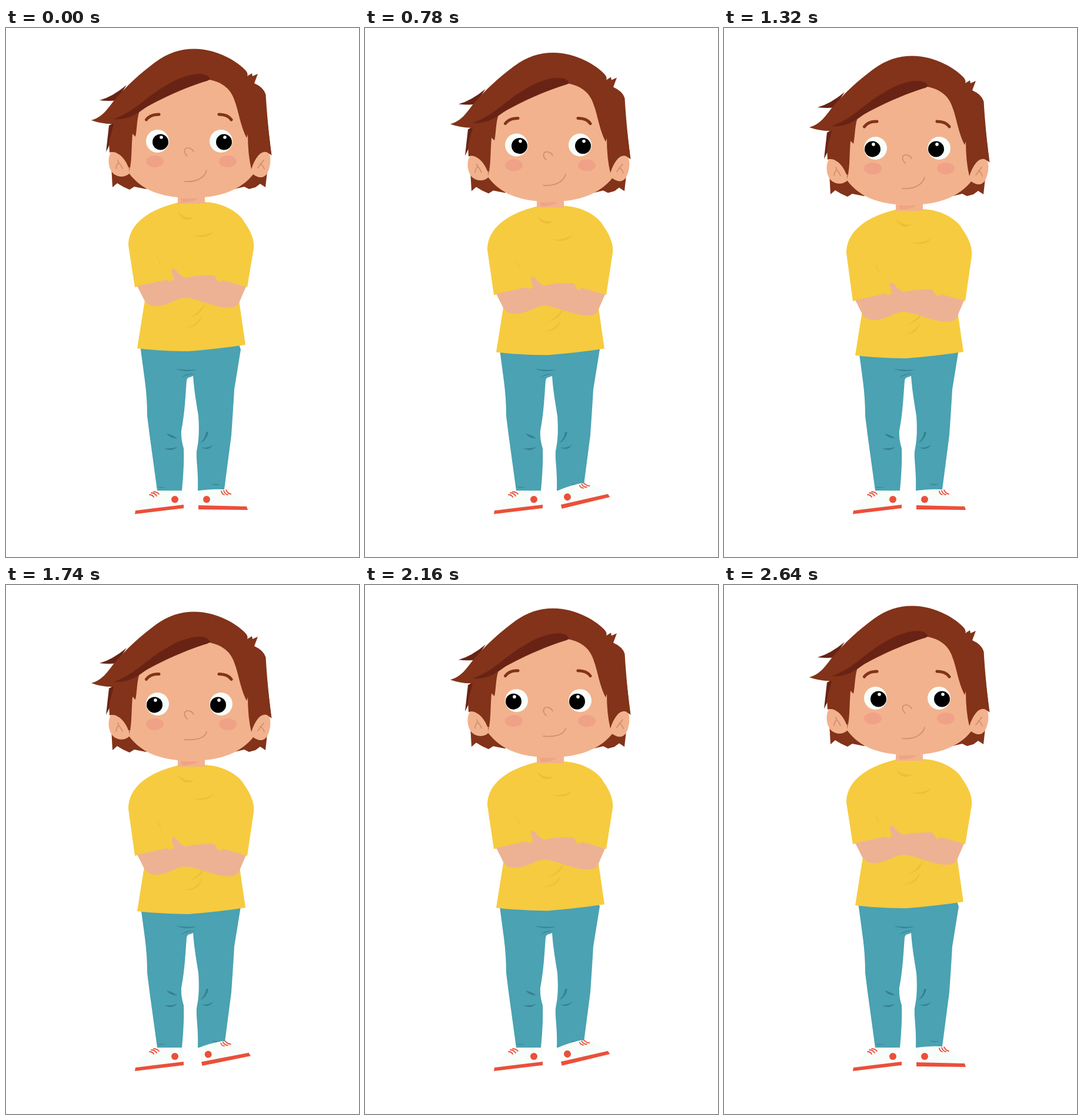
An HTML page that plays this animation: 600x900 px, repeating every 2.7 s.

```html
<!DOCTYPE html>
<html lang="en">
<head>
<meta charset="utf-8">
<title>Boy tapping his foot</title>
<style>
  html, body { margin: 0; height: 100%; overflow: hidden; background: #fff; }
  svg { display: block; width: 100%; height: 100%; }
  .hair { fill: #823319; }
  .dark { fill: #682315; }
  .skin { fill: #f2b28d; }
  .shirt { fill: #f6cb3f; }
  .fold { fill: #edbe3c; }
  .white { fill: #f9fdfa; }
  .red { fill: #eb4f3a; }
  .line { fill: none; stroke: #d08e6e; stroke-width: 1.7; stroke-linecap: round; }
  .lace { fill: none; stroke: #eb4f3a; stroke-width: 1.8; stroke-linecap: round; }
  .brow { fill: none; stroke: #823319; stroke-width: 5; stroke-linecap: round; }
</style>
</head>
<body>
<svg viewBox="0 0 600 900">
  <g id="legs">
    <path fill="#4aa2b2" d="M228 540L236 600Q240 630 240 660L244 692L257 787H299C301 765 303 740 302 715C297 698 298 690 298 685C304 655 305 625 307 600Q308 594 313 594L318 592C320 620 324 640 327 660C329 690 327 705 324 720C323 738 327 750 326 787L371 785L383 693Q386 650 388 615L399 547L395 535Z"/>
    <path fill="#36808e" d="M289 580Q305 583 325 581Q307 587 289 580M298 595Q305 587 323 588Q308 589 298 595M273 690Q283 692 291 698Q280 699 273 690M269 715Q280 716 291 713Q280 722 269 715M330 706Q339 698 340 688Q346 684 342 694Q338 703 330 706M331 713Q342 716 352 709Q344 721 331 713M256 780Q262 782 273 781Q262 784 256 780M349 775Q357 777 365 776Q357 780 349 775"/>
  </g>
  <g id="leftShoe">
    <path class="white" d="M257 787Q232 798 220 822L302 812L301 787Z"/>
    <path class="red" d="M220 821L302 811V817L219 827Z"/>
    <circle class="red" cx="287" cy="802" r="6"/>
    <path class="lace" d="M244 794Q249 794 251 798M247 791Q253 791 256 796M251 789Q257 789 260 793"/>
  </g>
  <g id="rightShoe">
    <path class="white" d="M326 788Q345 784 369 785Q399 794 409 815L327 813Z"/>
    <path class="red" d="M327 812L409 814L411 820L327 819Z"/>
    <circle class="red" cx="341" cy="802" r="6"/>
    <path class="lace" d="M366 788Q367 793 371 794M370 787Q372 793 377 794M374 786Q377 792 382 793"/>
  </g>
  <g id="body">
    <path class="skin" d="M292 280H338V301H292Z"/>
    <path fill="#eea486" d="M297 290H327Q318 297 299 297Z"/>
    <path class="shirt" d="M240 420L236 463L223 545Q265 550 310 550Q360 546 407 539L396 463L392 420Z"/>
    <path class="shirt" id="sleeves"/>
    <path class="fold" d="M292 313Q304 325 320 322Q303 334 292 313M318 353Q340 355 353 345Q342 361 318 353M310 493Q327 487 338 468Q334 488 310 493M301 509Q322 510 333 489Q328 512 301 509M256 387Q261 399 266 405Q259 400 256 387"/>
    <path id="arms" fill="#edb294" d="M223 439L235 463Q241 474 258 473C280 471 288 460 305 459C330 461 350 475 378 476Q392 476 396 468L408 440L369 429L362 433L354 421Q328 420 305 425Q296 421 292 416Q288 408 282 410Q281 418 286 427L279 431L274 428Z"/>
    <g id="head">
      <path class="hair" d="M179 235L181 271L189 264L199 270L210 275L218 270L238 274L250 265L205 235ZM445 235L441 271L432 265L424 271L413 274L405 270L388 274L378 265L418 235Z"/>
      <path class="dark" d="M185 160L175 166L170 211L180 190ZM443 150L451.500 217L444 209ZM159 123Q181 117 205 97L188 123Q176 125 159 123"/>
      <path class="skin" d="M178 212C188 207 203 222 209 236L210 247C203 255 188 255 180 245C173 235 173 220 178 212M447 212C440 205 425 215 417 238L419 248C430 257 440 256 445 245C451 232 450 218 447 212"/>
      <path class="skin" d="M212 140V230L209 247C230 275 262 289 315 289C365 289 400 275 421 248L417 190L395 85H346L227 130Z"/>
      <path class="hair" d="M145 157C165 151 172 138 184 123C205 98 230 76 250 61C273 43 295 35.500 320 35.500C360 35.500 395 58 408 73Q412 78 410 82L418 77L419 82L428 78L422 94Q438 101 441.500 113C443 140 446 172 451 216L446 213C438 206 425 215 417 240Q411 215 411 181L409 187C398 165 395 140 389 125C383 105 370 93 346 88C300 103 260 122 227 141C222 155 223 172 220 185L215 180C213 205 214 220 211 238L208 237C203 222 188 207 176 212L175 195C177 185 181 172 183 163Q165 164 145 157Z"/>
      <path class="dark" d="M183 155C220 142 240 115 275 96C300 80 340 70 347 87Q343 90 338 91C300 103 260 120 235 137C215 152 200 156 183 155"/>
      <path class="line" d="M187 239Q189 229 192 230Q194 231 198 239M190 225L192 230M438 225L428 238M432 231Q436 232 439 240"/>
      <ellipse cx="253" cy="227" rx="15" ry="10" fill="#efa287"/>
      <ellipse cx="377" cy="227" rx="15" ry="10" fill="#efa287"/>
      <path class="brow" id="brows" d="M238.500 156Q245 147 260 147M362 147Q377 147 383 156"/>
      <circle class="white" cx="257.500" cy="192.500" r="19.500"/>
      <circle class="white" cx="365.500" cy="192.500" r="19.500"/>
      <g id="pupils">
        <circle cx="262.500" cy="194" r="13.500"/>
        <circle cx="370.500" cy="194" r="13.500"/>
        <circle class="white" cx="264" cy="186" r="2.800"/>
        <circle class="white" cx="372" cy="186" r="2.800"/>
      </g>
      <path class="line" d="M308 218C300 210 304 204 309 204Q315 204 319 210"/>
      <path class="line" id="mouth"/>
    </g>
  </g>
</svg>
<script>
  const LOOP = 2700, STEP = 60, TAP = LOOP / 2;
  const part = id => document.getElementById(id);
  const place = (id, value) => part(id).setAttribute('transform', value);
  const shape = (id, path) => part(id).setAttribute('d', path);

  // Smooth 0..1 ramp between two times
  const ramp = (t, from, to) => {
    const u = Math.min(1, Math.max(0, (t - from) / (to - from)));
    return u * u * (3 - 2 * u);
  };
  // Ramp up, hold, ramp down
  const pulse = (t, on, off, length) => ramp(t, on, on + length) - ramp(t, off, off + length);

  // Shoulders stay with the body while the hems sink by `drop`
  const sleevePath = drop => {
    const y = v => v + drop;
    return `M292 297C255 306 208 327 208 ${370 + drop * 0.1}L219 ${y(441)}L275 ${y(428)}H365L410 ${y(441)}` +
      `L421 ${375 + drop * 0.1}Q423 355 405 330C398 315 370 297 338 296V299H292Z`;
  };

  // The smile flattens as `lift` goes from 0 to 1
  const mouthPath = lift =>
    `M303 ${261 - 8 * lift}C322 ${263 - 8 * lift} 338 ${255 - 4 * lift} 341 ${242 - 2 * lift}`;

  function draw(t) {
    const phase = Math.min(1, Math.max(0, t - 95) / 2580);
    const drop = 6 * (1 - Math.cos(2 * Math.PI * phase));
    const lift = pulse(t, 1440, 2310, 300);
    place('body', `translate(0 ${drop})`);
    place('arms', `translate(0 ${drop})`);
    shape('sleeves', sleevePath(drop));
    shape('mouth', mouthPath(lift));
    place('brows', `translate(0 ${-5.5 * lift})`);
    place('pupils', `translate(${-10 * pulse(t, 960, 2310, 180)} 0)`);
    place('rightShoe', `rotate(${-14.3 * pulse(t % TAP, 85, 870, 400)} 326 788)`);
  }

  function tick() {
    const t = performance.now() % LOOP;
    draw(Math.floor(t / STEP) * STEP);
    requestAnimationFrame(tick);
  }
  tick();
</script>
</body>
</html>
```
